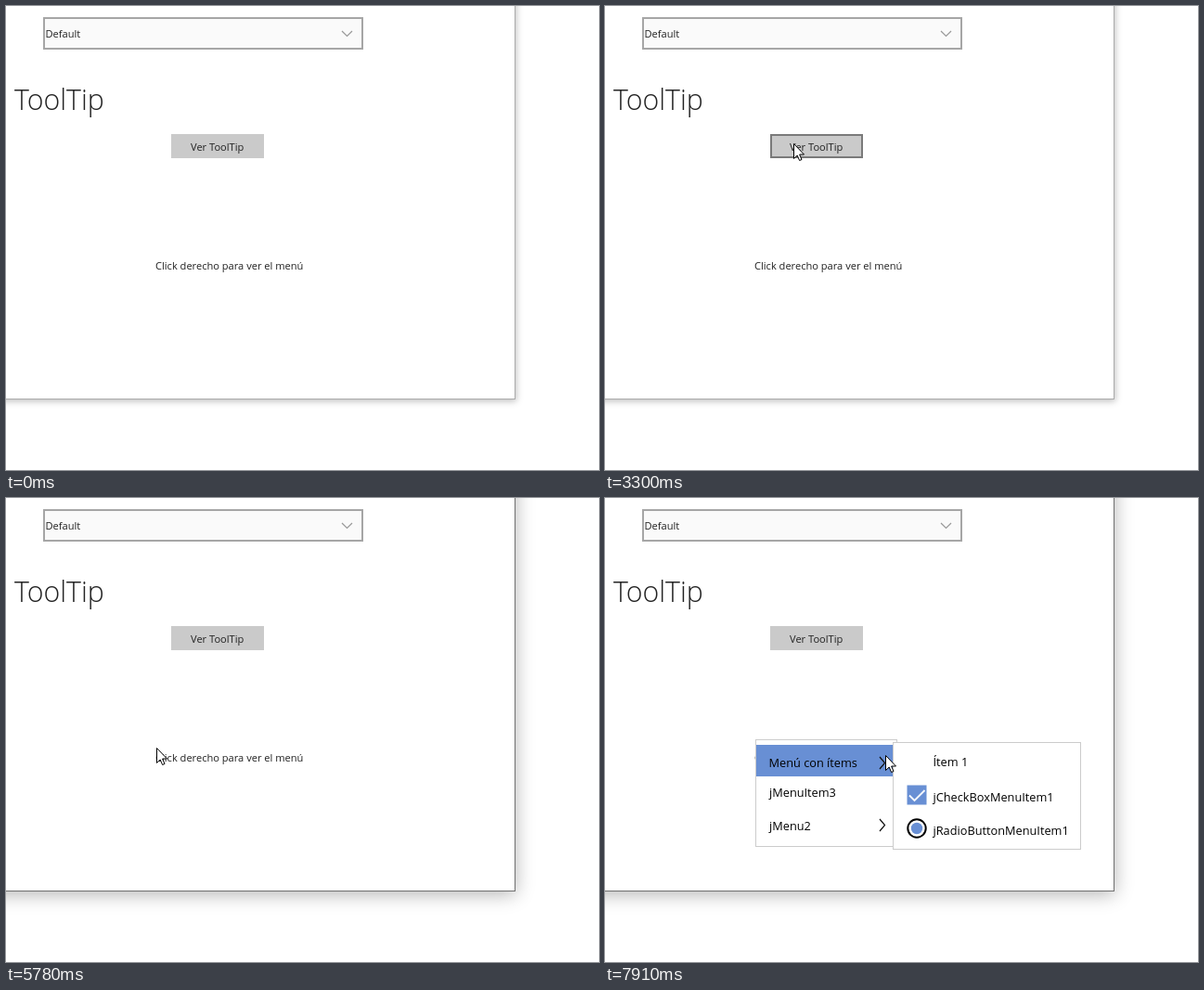
Animation, 639 px wide and 500 px high, one loop 8000 ms. Source, as an HTML page:

```html
<!DOCTYPE html>
<html lang="es">
<head>
<meta charset="utf-8">
<title>ToolTip</title>
<style>
  html, body { margin: 0; width: 100%; height: 100%; overflow: hidden; background: #fff; }
  #window {
    position: absolute; left: -60px; top: -60px; width: 608px; height: 483px;
    background: #fff; border: solid #aaa; border-width: 0 1px 1px 0;
    box-shadow: 1px 2px 7px rgba(0, 0, 0, .26);
  }
  #window.active { border-color: #707070; box-shadow: 0 3px 19px rgba(0, 0, 0, .3); }
  svg { position: absolute; left: 0; top: 0; }
  text { font: 11.1px "Open Sans", "Noto Sans", sans-serif; fill: #222; }
  .title { font-size: 30.3px; font-weight: 350; }
  .menu text { font-size: 12.75px; fill: #000; }
  .panel { fill: #fff; stroke: #ccc; }
  .arrow { fill: none; stroke: #111; stroke-width: 1.2; }
  .accent { fill: #688fd4; }
</style>
</head>
<body>
<div id="window"></div>
<svg width="639" height="500" viewBox="0 0 639 500">
  <rect x="41" y="13" width="343" height="33" fill="#fafafa" stroke="#a6a6a6" stroke-width="2"/>
  <text x="42.5" y="34">Default</text>
  <path d="M362 27l5.5 5.5l5.5-5.5" fill="none" stroke="#999" stroke-width="1.2"/>

  <text class="title" x="9" y="112">ToolTip</text>
  <rect x="178" y="138" width="100" height="26" fill="#cacaca"/>
  <rect id="hover" x="179" y="139" width="98" height="24" fill="none" stroke="#7a7a7a" stroke-width="2"/>
  <text x="199" y="156">Ver ToolTip</text>
  <text x="161" y="284">Click derecho para ver el menú</text>

  <g id="tooltip">
    <rect x="191" y="173" width="182" height="26" fill="#f2f2f2" stroke="#cacaca" stroke-width="2"/>
    <text x="197.5" y="190">Prueba de texto para un tooltip</text>
  </g>

  <g id="menu" class="menu">
    <rect class="panel" x="162.5" y="260.5" width="152" height="115"/>
    <rect id="highlight" class="accent" x="163" y="266" width="151" height="34"/>
    <text x="176.5" y="290">Menú con ítems</text>
    <text x="177" y="322">jMenuItem3</text>
    <text x="177" y="358">jMenu2</text>
    <path class="arrow" d="M296 279l5.5 6.5l-5.5 6.5m0 54l5.5 6.5l-5.5 6.5"/>
  </g>

  <g id="submenu" class="menu">
    <rect class="panel" x="310.5" y="263.5" width="202" height="115"/>
    <text x="353.5" y="289">Ítem 1</text>
    <rect class="accent" x="325.5" y="309.5" width="21" height="21"/>
    <path d="M328 320.5l5.5 5.5l11-11" fill="none" stroke="#fff" stroke-width="1.8"/>
    <text x="353.5" y="327">jCheckBoxMenuItem1</text>
    <circle cx="336" cy="356" r="9.7" fill="#fff" stroke="#000" stroke-width="2"/>
    <circle class="accent" cx="336" cy="356" r="6.2"/>
    <text x="353.5" y="363">jRadioButtonMenuItem1</text>
  </g>

  <path id="cursor" d="M.5 .5V16.5L4.2 13L6.6 18.5L9 17.5L6.6 12H11.5Z" fill="#fff" stroke="#000"/>
</svg>
<script>
const LOOP = 8000;
const ENTRY = [351, 447];

// Each move curves from the previous stop to `to`; without a bend it is straight
const moves = [
  { start: 130, end: 420, steps: 5, bend: [240, 280], to: [200, 237] },
  { start: 690, end: 690, steps: 1, to: [201, 237] },
  { start: 890, end: 1380, steps: 8, bend: [207, 195], to: [204, 148] },
  { start: 3300, end: 3300, steps: 1, to: [203, 148] },
  { start: 3370, end: 3580, steps: 4, to: [114, 140] },
  { start: 3650, end: 3940, steps: 5, to: [230, 151] },
  { start: 4870, end: 5640, steps: 12, bend: [15, 230], to: [148, 274] },
  { start: 5710, end: 5780, steps: 2, to: [162, 269] },
  { start: 5850, end: 6060, steps: 4, bend: [165, 231], to: [162, 260] },
  { start: 6600, end: 7020, steps: 7, bend: [173, 274], to: [198, 277] },
  { start: 7220, end: 7910, steps: 10, to: [302, 277] }
];

const $ = id => document.getElementById(id);
const show = (id, on) => $(id).setAttribute("visibility", on ? "visible" : "hidden");
const easeOut = t => 1 - (1 - t) ** 2;
const mix = (a, b, t) => a.map((v, axis) => v + (b[axis] - v) * t);

function pointerAt(time) {
  let position = ENTRY;
  for (const { start, end, steps, to, bend = mix(position, to, .5) } of moves) {
    if (time < start) break;
    const interval = (end - start) / (steps - 1) || 1;
    const step = Math.min(steps, 1 + Math.floor((time - start) / interval + .01));
    const t = easeOut(step / steps);
    position = mix(mix(position, bend, t), mix(bend, to, t), t);
  }
  return position.map(Math.round);
}

function draw(time) {
  const [x, y] = pointerAt(time);
  const overButton = x >= 178 && x < 278 && y >= 138 && y < 164;
  $("cursor").setAttribute("transform", `translate(${x} ${y})`);
  $("window").classList.toggle("active", time >= 3580);
  show("cursor", time >= moves[0].start);
  show("hover", overButton);
  show("tooltip", overButton && time >= 3940);
  show("menu", time >= 6120);
  show("highlight", time >= 6120 && y >= 266);
  show("submenu", time >= 6950);
}

function frame() {
  draw(performance.now() % LOOP);
  requestAnimationFrame(frame);
}
frame();
</script>
</body>
</html>
```
